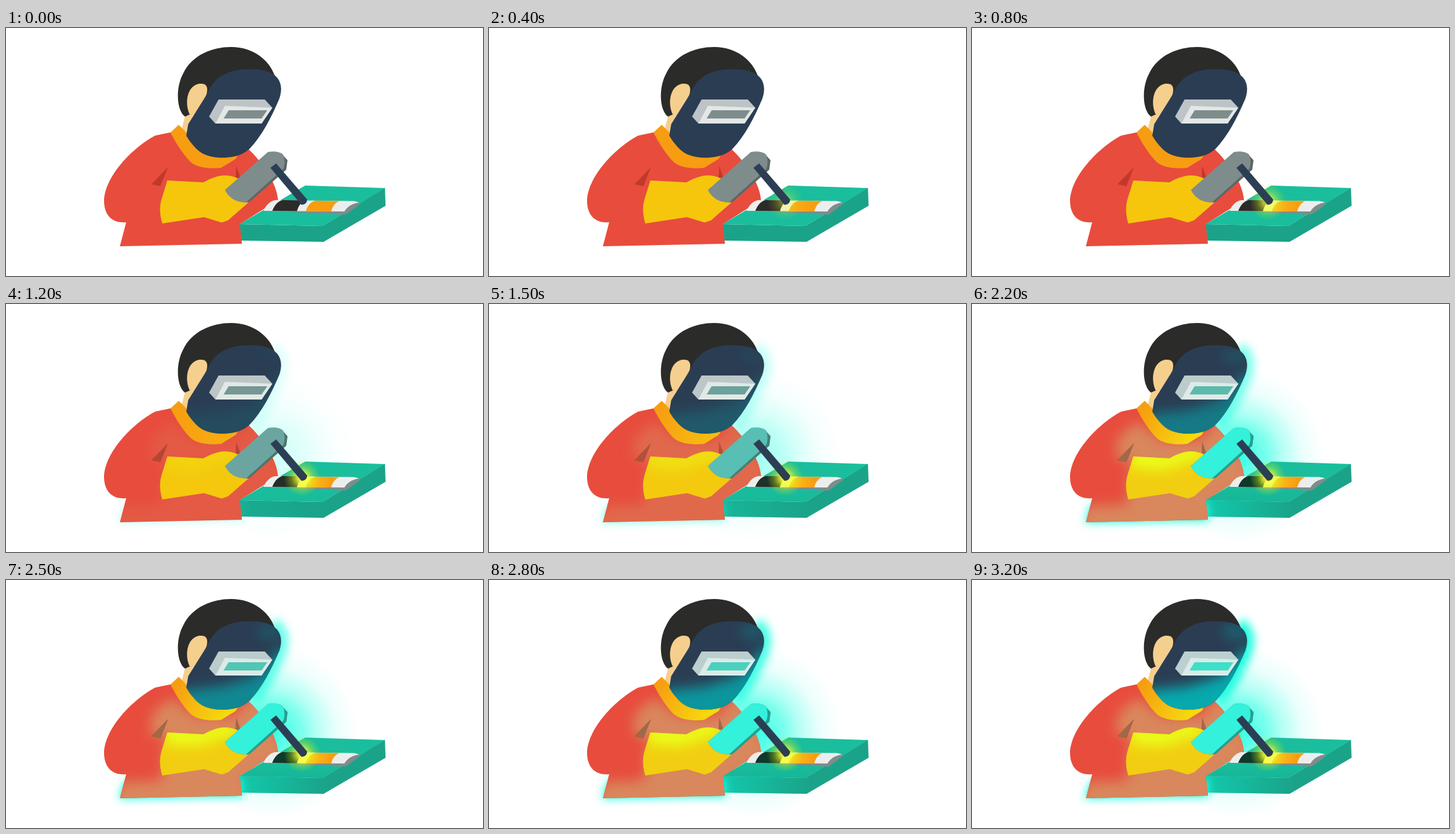
These frames come from a looping animation (754 by 392 pixels, 3.3 s). An HTML page:

```html
<!DOCTYPE html>
<html lang="en">
<head>
<meta charset="utf-8">
<title>Welder</title>
<style>
html, body { margin: 0; width: 100%; height: 100%; overflow: hidden; background: #fff; }
svg { display: block; width: 754px; height: 392px; }

/* The light spreads in tenths of a second, then the loop cuts back to dark. */
.spark, .body, .face { animation: spark 3300ms infinite; }
.body { animation-name: body; }
.face { animation-name: face; }
@keyframes spark {
  0% { opacity: 0; animation-timing-function: steps(10); }
  30.303%, 100% { opacity: 1; }
}
@keyframes body {
  0%, 27.2727% { opacity: 0; animation-timing-function: steps(12); }
  63.6364%, 100% { opacity: 1; }
}
@keyframes face {
  0%, 27.2727% { opacity: 0; animation-timing-function: steps(23); }
  96.9697%, 100% { opacity: 1; }
}
.soft { filter: blur(7px); }
.softer { filter: blur(10px); }
</style>
</head>
<body>
<svg viewBox="0 0 754 392">
  <defs>
    <path id="torso" d="M236 170 L260 165 L290 180 L383 191 C404 211 428 244 430 272 L369.500 310 L373 341 L180 345 L190 307 C171 309 156 299 155 275 C155 235 200 189 236 170Z"/>
    <path id="collar" d="M260 165 L273 153 L300 180 L366 202 L363 207 L340 221 C320 223 302 221 291 211 C278 197 268 181 260 165Z"/>
    <path id="mask" d="M318 104 C328 78 350 65 386 65 C405 65 418 69 425 75 C436 84 437 98 432 112 C420 140 405 170 385 191 C372 203 355 205 340 205 C325 205 310 200 302 192 C294 184 288 176 285 170 L288 152Z"/>
    <path id="glove" d="M255 241 L312 244 C325 237 335 233 346 233 C356 233 364 236 371 240 L372 260 L383 276 L351 304 L341 307.500 L313 299 L247 309 C242 291 243 281 246 270Z"/>
    <path id="bar" d="M346 256 L414 196 C424 194 434 196 438 200 C441 208 441 217 438 223 L379 276 C362 275 352 268 346 256Z"/>
    <path id="barSide" d="M436 199 L445 209 L443 224 L385 275 L378 276 L438 222Z"/>
    <path id="frame" d="M336 113 L409 113 L421 126 L404 151 L331 151 L321 140Z"/>
    <path id="glass" d="M352 130 L413 130 L404 143 L344 143Z"/>
    <path id="folds" d="M256 220 L230 247 L244 250Z M364 218 L363 237 L371 238Z"/>
    <path id="benchTop" d="M473 249 L599 253 L500 313 L369 310Z"/>
    <path id="benchSide" d="M369 310 L500 313 L599 252.500 L600 281 L502 338 L372 336Z"/>
    <path id="black" d="M421 289 C424 281 429 274 437 272 L473 272.500 C466 275 462 282 460 289.500Z"/>

    <clipPath id="inTorso"><use href="#torso"/></clipPath>
    <clipPath id="inMask"><use href="#mask"/></clipPath>
    <clipPath id="inGlove"><use href="#glove"/></clipPath>

    <radialGradient id="halo">
      <stop offset="0" stop-color="#1dffe0" stop-opacity=".9"/>
      <stop offset=".35" stop-color="#1dffe0" stop-opacity=".58"/>
      <stop offset=".5" stop-color="#1dffe0" stop-opacity=".35"/>
      <stop offset=".75" stop-color="#1dffe0" stop-opacity=".09"/>
      <stop offset="1" stop-color="#1dffe0" stop-opacity="0"/>
    </radialGradient>
    <radialGradient id="flash">
      <stop offset="0" stop-color="#ffff5a"/>
      <stop offset=".25" stop-color="#fbff3c" stop-opacity=".85"/>
      <stop offset=".6" stop-color="#d8f51e" stop-opacity=".35"/>
      <stop offset="1" stop-color="#c8f000" stop-opacity="0"/>
    </radialGradient>
    <linearGradient id="collarLight" gradientUnits="userSpaceOnUse" x1="268" y1="165" x2="345" y2="215">
      <stop offset="0" stop-color="#f5d90f" stop-opacity="0"/>
      <stop offset="1" stop-color="#f5d90f"/>
    </linearGradient>
    <linearGradient id="benchLight" gradientUnits="userSpaceOnUse" x1="370" y1="0" x2="510" y2="0">
      <stop offset="0" stop-color="#10d2b5" stop-opacity=".8"/>
      <stop offset="1" stop-color="#10d2b5" stop-opacity="0"/>
    </linearGradient>
    <linearGradient id="benchShade" gradientUnits="userSpaceOnUse" x1="0" y1="285" x2="0" y2="313">
      <stop offset="0" stop-color="#14b094" stop-opacity="0"/>
      <stop offset="1" stop-color="#14b094" stop-opacity=".6"/>
    </linearGradient>
    <linearGradient id="orangeLight" gradientUnits="userSpaceOnUse" x1="474" y1="0" x2="515" y2="0">
      <stop offset="0" stop-color="#ffc61e"/>
      <stop offset="1" stop-color="#ffc61e" stop-opacity="0"/>
    </linearGradient>
  </defs>

  <circle class="body" cx="420" cy="240" r="136" fill="url(#halo)"/>

  <use href="#benchSide" fill="#1ba389"/>
  <use href="#benchTop" fill="#1abe9d"/>
  <g class="body">
    <use href="#benchSide" fill="url(#benchLight)"/>
    <use href="#benchTop" fill="url(#benchShade)"/>
    <path class="soft" fill="#22ffe0" d="M187 318 L178 346 L374 343 L373 314Z"/>
  </g>
  <g class="face">
    <path class="soft" fill="none" stroke="#22ffe0" stroke-width="30" d="M419 72 C433 84 433 98 428 112 C416 140 402 170 385 188"/>
  </g>

  <use href="#torso" fill="#e84c3d"/>
  <g clip-path="url(#inTorso)">
    <g class="body">
      <path class="softer" fill="#d9875d" d="M232 210 L262 186 L300 215 L360 215 L395 175 L450 280 L385 315 L390 365 L160 365 L180 319 L245 317 L252 246 L226 244Z"/>
    </g>
  </g>
  <use href="#folds" fill="#c0392b"/>
  <use class="body" href="#folds" fill="#9e6a48"/>

  <path fill="#f5cf8e" d="M283 139 L292 134 L300 150 L286 172 L278 159Z"/>
  <use href="#collar" fill="#f79d12"/>
  <use class="body" href="#collar" fill="url(#collarLight)"/>
  <path fill="#2b2b2a" d="M283 140 C269 130 268 94 280 72 C294 43 325 30 356 30 C390 30 416 50 425 76 L340 110 L292 136Z"/>
  <path fill="#f5cf8e" d="M290 136 C282 118 286 91 306 88 C317 87 320 93 317 105 L300 142Z"/>

  <use href="#mask" fill="#2b3d53"/>
  <g clip-path="url(#inMask)">
    <g class="face">
      <path class="softer" fill="#06a9ae" d="M270 175 L340 168 L395 152 L440 100 L450 225 L280 225Z"/>
      <ellipse class="softer" cx="416" cy="82" rx="20" ry="10" fill="#12808a" opacity=".7"/>
    </g>
  </g>
  <use href="#frame" fill="#bdc3c6"/>
  <path fill="#e3e7e6" d="M346 123 L421 126 L404 151 L331 151Z"/>
  <use href="#glass" fill="#7f8c8c"/>
  <g class="face">
    <use href="#frame" fill="#b8fff4" opacity=".22"/>
    <use href="#glass" fill="#3ee0c8"/>
  </g>

  <use href="#glove" fill="#f6c60d"/>
  <g clip-path="url(#inGlove)">
    <g class="body">
      <use href="#glove" fill="#efd214" opacity=".7"/>
      <path class="softer" fill="#e9ff1a" d="M245 228 L312 236 L350 222 L375 240 L340 250 L305 262 L255 260Z"/>
    </g>
  </g>

  <use href="#barSide" fill="#5c6766"/>
  <use href="#bar" fill="#7f8c8c"/>
  <g class="body">
    <use href="#barSide" fill="#23a08e"/>
    <use href="#bar" fill="#33f1da"/>
  </g>

  <path fill="#7f8c8c" d="M407 289 L535 289 L545 274 C552 273 558 275 560 278 C551 284 545 290 536 295Z"/>
  <path fill="#eceeee" d="M407 289 C411 280 418 272 428 272 L545 273.500 C550 273.500 555 274 558 276 C547 277 539 283 535 290Z"/>
  <use href="#black" fill="#2b2b2a"/>
  <path id="orange" fill="#f79d12" d="M474 289.500 C476 282 481 275 489 273 L527 273.500 C519 277 516 283 514 290Z"/>
  <use class="body" href="#black" fill="#0d3a2a" opacity="1"/>
  <g class="spark">
    <path fill="url(#orangeLight)" d="M474 289.500 C476 282 481 275 489 273 L527 273.500 C519 277 516 283 514 290Z"/>
    <path fill="#fbff7a" d="M460 289.500 C462 282 466 275 473 272.500 L489 273 C481 275 476 282 474 289.500Z"/>
    <circle cx="468" cy="275" r="29" fill="url(#flash)"/>
  </g>

  <path fill="#2c3e54" d="M418 221 L427 214 L476 271 C476 276 473 279 467 279.500Z"/>
</svg>
</body>
</html>
```
